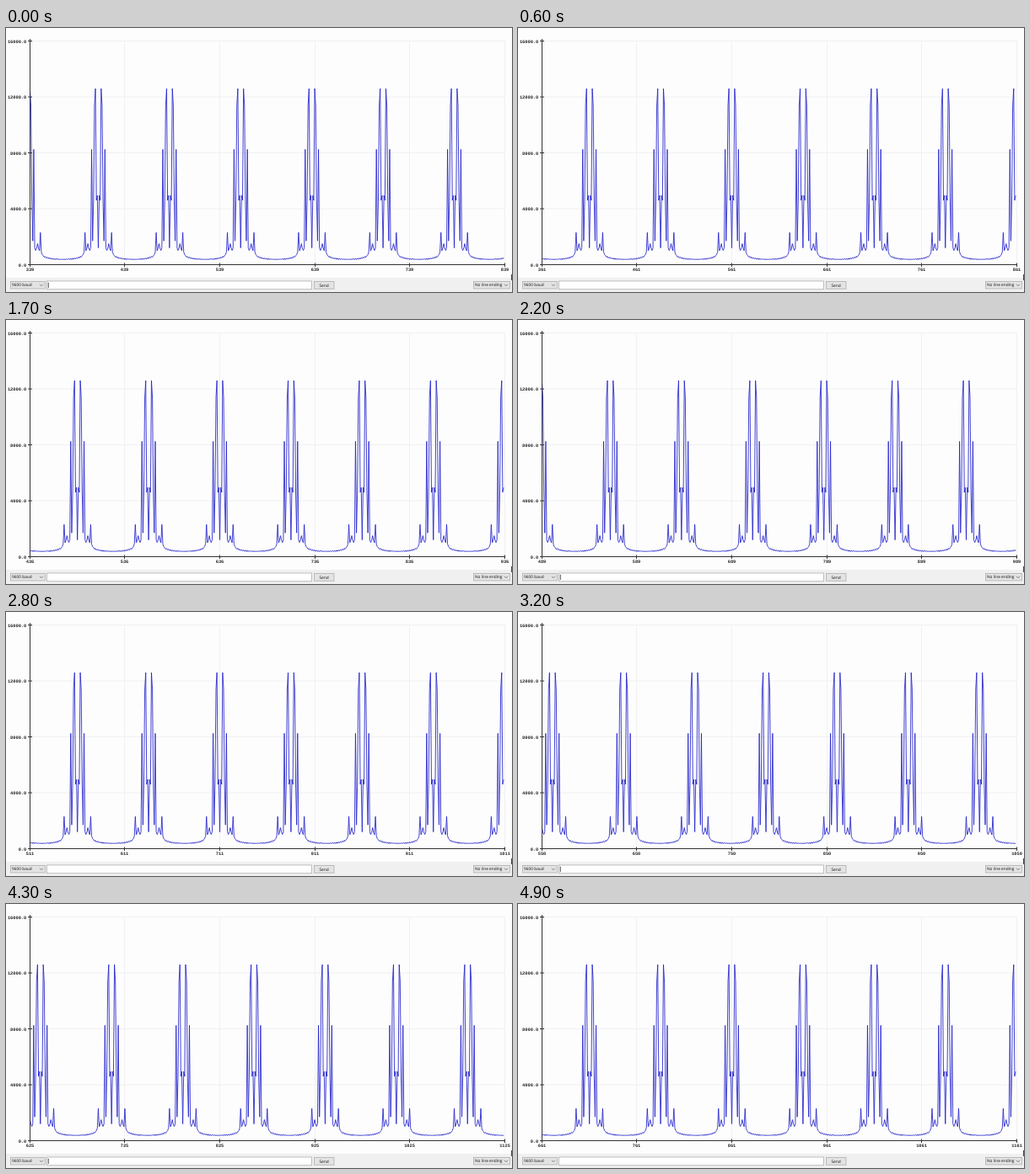
An HTML page that plays this animation: 600 by 314 pixels, repeating every 5 s.

```html
<!DOCTYPE html>
<html lang="en">
<head>
<meta charset="utf-8">
<title>Serial plotter</title>
<style>
  html, body { margin: 0; width: 100%; height: 100%; overflow: hidden; background: #fdfdfd; }
  svg { display: block; width: 600px; height: 314px; }
  text { text-rendering: geometricPrecision; }
  .mono { font: bold 5.3px "Liberation Mono", monospace; fill: #222; }
  .ui { font: 4.8px "Open Sans", sans-serif; fill: #111; }
  .grid { stroke: #f1f1f1; }
  .axis { stroke: #333; }
  .box { fill: #e3e3e3; stroke: #b0b0b0; stroke-width: .8; }
  .chevron { fill: none; stroke: #555; stroke-width: .7; }
  #wave { fill: none; stroke: #2222cc; stroke-width: .85; stroke-linejoin: bevel; }
</style>
</head>
<body>
<svg viewBox="0 0 600 314">
  <g id="plot"></g>
  <polyline id="wave"/>
  <path class="axis" d="M28.5 13V284M26 281.5H591.5"/>
  <g id="ticks"></g>

  <rect y="297" width="600" height="17" fill="#f0f0f0"/>
  <rect x="599" y="293" width="1" height="7" fill="#444"/>
  <rect class="box" x="5.5" y="301.5" width="41" height="8.5"/>
  <text class="ui" x="7" y="307.4">9600 baud</text>
  <path class="chevron" d="M40 304.8l2 2l2-2"/>
  <rect class="box" x="48.5" y="301" width="314" height="9.8" style="fill:#fff"/>
  <path id="caret" d="M50.3 302.8V309" stroke="#222" stroke-width=".8"/>
  <rect class="box" x="365.5" y="301.5" width="23.5" height="8.8"/>
  <text class="ui" x="377" y="307.6" text-anchor="middle">Send</text>
  <rect class="box" x="554.5" y="301.5" width="43" height="8.5"/>
  <text class="ui" x="556" y="307.4">No line ending</text>
  <path class="chevron" d="M591 304.8l2 2l2-2"/>
</svg>
<script>
const get = id => document.getElementById(id);
const LEFT = 28.4, STEP = 1.1255, SAMPLES = 500, PERIOD = 75;
const xAt = i => LEFT + i * STEP;
const yAt = v => 281.5 - v * 0.016625;

function add(parent, tag, attrs, content = "") {
  const el = document.createElementNS("http://www.w3.org/2000/svg", tag);
  for (const name in attrs) el.setAttribute(name, attrs[name]);
  el.textContent = content;
  parent.append(el);
  return el;
}

for (let v = 0; v <= 16000; v += 4000) {
  const y = Math.round(yAt(v) * 2) / 2;
  if (v) add(get("plot"), "path", { class: "grid", d: `M29 ${y}H591` });
  add(get("ticks"), "path", { class: "axis", d: `M26 ${y}h5` });
  add(get("ticks"), "text", { class: "mono", x: 24.2, y: y + 2, "text-anchor": "end" }, v.toFixed(1));
}
const labels = [];
for (let i = 0; i <= SAMPLES; i += 100) {
  const x = Math.floor(xAt(i)) + 0.5;
  if (i) add(get("plot"), "path", { class: "grid", d: `M${x} 15V281` });
  add(get("ticks"), "path", { class: "axis", d: `M${x} 279.5v4.5` });
  labels.push(add(get("ticks"), "text", { class: "mono", x, y: 288.6, "text-anchor": "middle" }));
}

// Symmetric pulse: values by distance from its centre, then a rippling tail
const pulse = [1200, 4950, 4600, 12600, 11400, 4600, 1700, 8250, 1200,
  1020, 1180, 1500, 1180, 1000, 2300, 900, 720, 640];
function sample(n) {
  const phase = (n - 36) % PERIOD;
  const d = Math.min(phase, PERIOD - phase);
  if (d < pulse.length) return pulse[d];
  const ripple = d < 32 ? (d % 2 ? 45 : -45) : 0;
  return 370 + 250 * Math.exp((17 - d) / 6) + ripple;
}

// One period of samples arrives in a quick burst, followed by a pause
function firstSample(t) {
  const clock = t + 379;
  const burst = Math.floor(0.14 * (clock % 1100));
  return 286 + PERIOD * Math.floor(clock / 1100) + Math.min(PERIOD, burst);
}

function draw() {
  const t = Math.floor(performance.now() % 5000 / 100) * 100;
  const first = firstSample(t);
  let points = "";
  for (let i = 0; i < SAMPLES; i++)
    points += `${xAt(i).toFixed(2)},${yAt(sample(first + i)).toFixed(2)} `;
  get("wave").setAttribute("points", points);
  labels.forEach((label, i) => label.textContent = first + i * 100);
  get("caret").style.display = t % 1060 < 530 ? "" : "none";
  requestAnimationFrame(draw);
}
draw();
</script>
</body>
</html>
```
